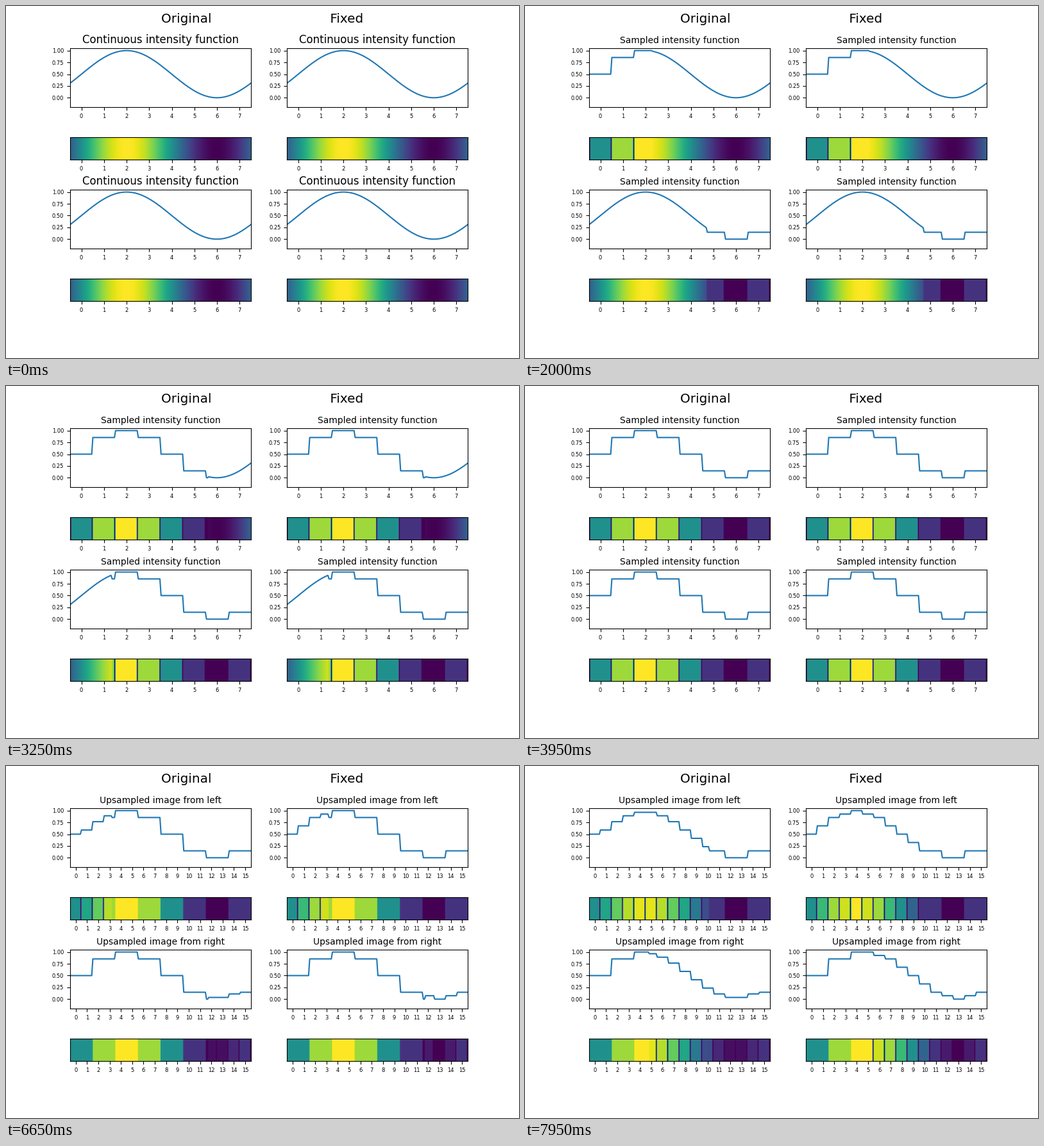
Animation of 800x550 px, one loop 8 s. Source, as a matplotlib script:

```python
import numpy as np
import matplotlib.pyplot as plt
from matplotlib.animation import FuncAnimation

INTERVAL = 50
FRAMES = 160
SAMPLE_START, UPSAMPLE_START = 20, 120
SWEEP = 60            # frames a full sweep takes
POINTS = 160          # points along each curve and strip
PIXELS = 8

index = np.arange(POINTS)


def intensity(x):
    return 0.5 + 0.5 * np.sin(2 * np.pi * x / PIXELS)


def spread(pixels):
    """Stretch a row of pixels over all points."""
    return np.repeat(pixels, POINTS // len(pixels))


def interleave(even, odd):
    return np.column_stack([even, odd]).ravel()


samples = intensity(np.arange(PIXELS))
before = np.r_[samples[0], samples[:-1]]
after = np.r_[samples[1:], samples[-1]]

continuous = intensity(np.linspace(-0.5, PIXELS - 0.5, POINTS))
sampled = spread(samples)
half_pixel = spread(interleave(0.25 * before + 0.75 * samples,
                               0.75 * samples + 0.25 * after))
from_left = spread(interleave(samples, (samples + after) / 2))
from_right = spread(interleave((before + samples) / 2, samples))

sample_gaps = (index % 20 == 19) | (index == 0)
upsample_gaps = index % 10 == 9


def sweep(old, new, gaps, step, leftward):
    """Replace old by new up to the sweep front; return curve and strip."""
    if leftward:
        done = index >= POINTS * (SWEEP - 1 - step) // SWEEP
    else:
        done = index < POINTS * (step + 1) // SWEEP
    curve = np.where(done, new, old)
    return curve, np.where(done & gaps, 0, curve)


def add_ticks(ax, axis, places, labels):
    """Light-weight tick marks and labels; returns their artists."""
    zeros = np.zeros(len(places))
    if axis == "x":
        xs, ys, marker = places, zeros, 3
        marks_transform = ax.get_xaxis_transform()
        transform, va, ha = ax.get_xaxis_text1_transform(7)
    else:
        xs, ys, marker = zeros, places, 0
        marks_transform = ax.get_yaxis_transform()
        transform, va, ha = ax.get_yaxis_text1_transform(7)
    artists = ax.plot(xs, ys, ls="none", marker=marker, ms=3.5, mew=0.8,
                      color="black", transform=marks_transform,
                      clip_on=False, zorder=2.6)
    for x, y, label in zip(xs, ys, labels):
        artists.append(ax.text(x, y, label, transform=transform, va=va,
                               ha=ha, fontsize=6))
    return artists


class Panel:
    """A curve above a colour strip of the same values."""

    def __init__(self, curve_ax, strip_ax, upsampled, leftward):
        self.axes = curve_ax, strip_ax
        self.upsampled = upsampled
        self.leftward = leftward
        self.line, = curve_ax.plot(index, continuous, lw=1.5, color="#1f77b4")
        self.strip = strip_ax.imshow(np.zeros((20, POINTS)), cmap="viridis",
                                     vmin=0, vmax=1, aspect="auto")
        self.title = curve_ax.set_title("", y=1.0)
        strip_ax.set_box_aspect(1 / 8)
        self.ticks = {}
        for count in (PIXELS, 2 * PIXELS):
            self.ticks[count] = [
                artist for ax in self.axes
                for artist in add_ticks(ax, "x", np.arange(count), range(count))]
        levels = np.linspace(0, 1, 5)
        add_ticks(curve_ax, "y", levels, [f"{v:.2f}" for v in levels])
        for ax in self.axes:
            ax.set_xticks([])
            ax.set_yticks([])
        curve_ax.set_ylim(-0.2, 1.05)
        strip_ax.set_ylim(0, 1)

    def show(self, curve, strip, title, size, count):
        self.line.set_data(np.linspace(-0.5, count - 0.5, POINTS), curve)
        self.strip.set_data(np.tile(strip, (20, 1)))
        self.strip.set_extent((-0.5, count - 0.5, 0, 1))
        self.title.set_text(title)
        self.title.set_fontsize(size)
        for ax in self.axes:
            ax.set_xlim(-0.5, count - 0.5)
        for key, artists in self.ticks.items():
            for artist in artists:
                artist.set_visible(key == count)

    def update(self, frame):
        if frame < SAMPLE_START:
            self.show(continuous, continuous,
                      "Continuous intensity function", 12, PIXELS)
        elif frame < UPSAMPLE_START:
            step = min(frame - SAMPLE_START, SWEEP - 1)
            curve, strip = sweep(continuous, sampled, sample_gaps, step,
                                 self.leftward)
            self.show(curve, strip, "Sampled intensity function", 10, PIXELS)
        else:
            curve, strip = sweep(sampled, self.upsampled, upsample_gaps,
                                 frame - UPSAMPLE_START, self.leftward)
            side = "right" if self.leftward else "left"
            self.show(curve, strip, f"Upsampled image from {side}", 10,
                      2 * PIXELS)


fig, axes = plt.subplots(4, 2, figsize=(8, 5.5), dpi=100)
fig.suptitle("Original" + " " * 29 + "Fixed", fontsize=14.4)

panels = [
    Panel(axes[0, 0], axes[1, 0], half_pixel, False),
    Panel(axes[0, 1], axes[1, 1], from_left, False),
    Panel(axes[2, 0], axes[3, 0], half_pixel, True),
    Panel(axes[2, 1], axes[3, 1], from_right, True),
]


def draw(frame):
    for panel in panels:
        panel.update(frame)
    return []


animation = FuncAnimation(fig, draw, frames=FRAMES, interval=INTERVAL,
                          repeat=True, repeat_delay=0)
plt.show()
```
